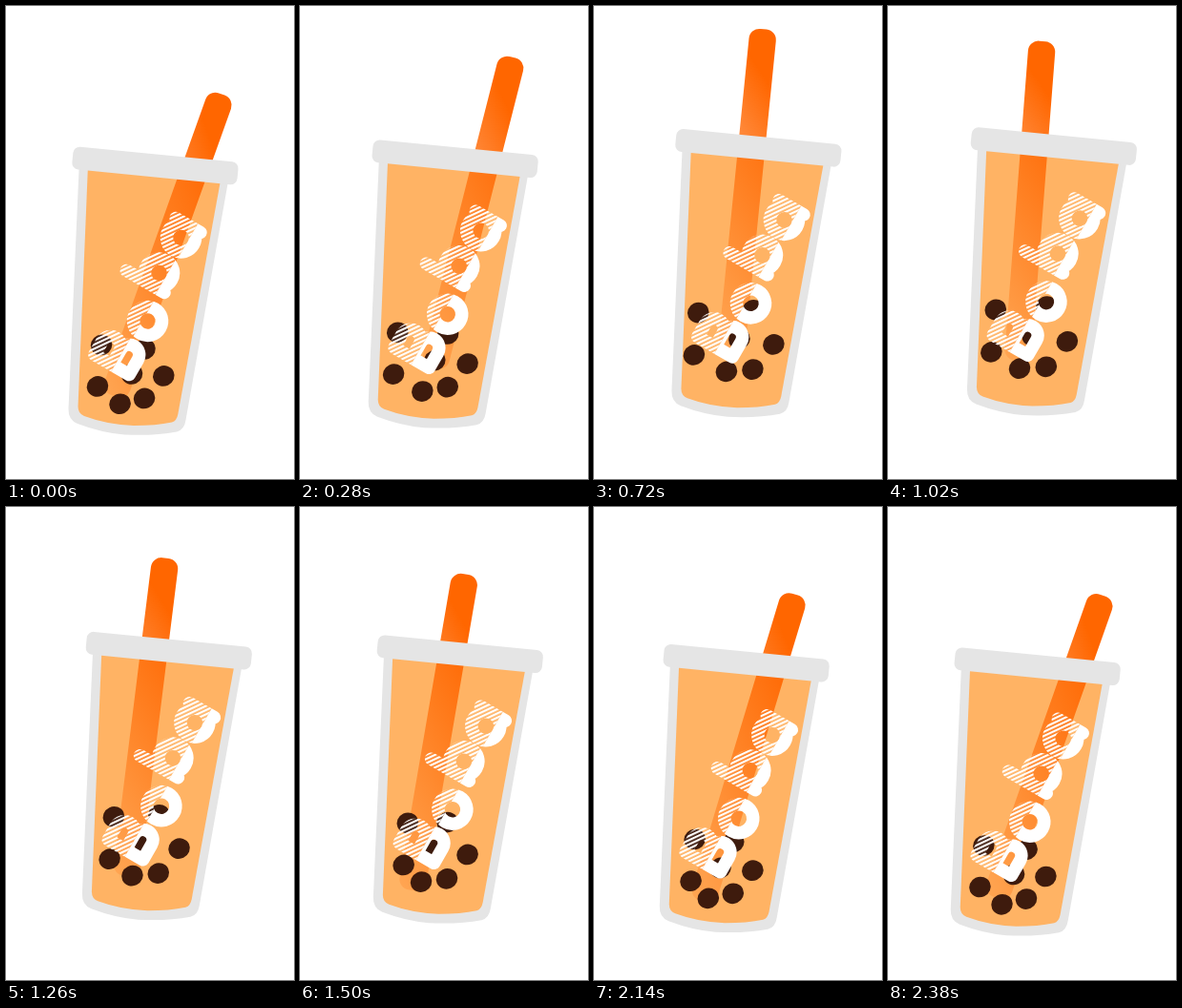
Animation, 302 px wide and 496 px high, one loop 2400 ms. Source, as an HTML page with a canvas:

```html
<!DOCTYPE html>
<html lang="en">
<head>
<meta charset="utf-8">
<title>Bubble tea</title>
<style>
  html, body { margin: 0; width: 100%; height: 100%; overflow: hidden; background: #fff; }
  canvas { display: block; }
</style>
</head>
<body>
<canvas id="stage" width="302" height="496"></canvas>
<script>
const ctx = document.getElementById('stage').getContext('2d');
const LOOP = 2400;
const TAU = Math.PI * 2;
const rad = deg => deg * Math.PI / 180;

// The cup rises, rests, then sinks.
function lift(t) {
  if (t < 800) return t / 800;
  return t < 1000 ? 1 : (LOOP - t) / 1400;
}

// The straw's foot stirs in three curved strokes, measured inside the cup.
const stir = [
  { at: 0, from: [113, 409], bend: [146.5, 381] },
  { at: 600, from: [132.5, 371], bend: [114.5, 397] },
  { at: 1600, from: [103, 419.5], bend: [109, 425] }
];

function strawFoot(t) {
  const i = stir.findLastIndex(stroke => t >= stroke.at);
  const { at, from, bend } = stir[i];
  const next = stir[i + 1] || { at: LOOP, from: stir[0].from };
  const s = (t - at) / (next.at - at);
  return [0, 1].map(k =>
    (1 - s) ** 2 * from[k] + 2 * s * (1 - s) * bend[k] + s * s * next.from[k]);
}

// Resting place of each pearl and how far it floats up.
const pearls = [
  [100, 355.5, 17], [145.5, 360, 25], [132, 386, 20], [96, 399, 16],
  [165.3, 388, 16], [145, 411.5, 13], [119.5, 417.3, 17]
];

const wall = new Path2D('M77 160L65.5 422Q65 434 75 438Q100 447.5 124 449.5Q155 451 179 446.5Q187 444.5 188.5 434L234 178Z');
const liquid = new Path2D('M86 166L75.5 420Q75.5 427.5 82 430Q106 439 134 440Q157 440 174 436.5Q179 435 180.3 428L225.5 180Z');

const glyphs = {
  B: new Path2D('M-14-21H2A10.5 10.5 0 0 1 2 0H-14H4A10.5 10.5 0 0 1 4 21H-14Z'),
  o: ring(),
  b: ring('M-15-31V15'),
  a: ring('M15-15V15')
};
// Each letter: shape, centre, and where its hatching ends.
const word = [['B', 118, 364, 3], ['o', 148.5, 330.5, -5], ['b', 160.5, 280, 8], ['a', 183.5, 243, 8]];

function ring(stem = '') {
  const path = new Path2D(stem);
  path.moveTo(15, 0);
  path.arc(0, 0, 15, 0, TAU);
  return path;
}

function makeHatch() {
  const tile = document.createElement('canvas');
  tile.width = tile.height = 4;
  const g = tile.getContext('2d');
  g.fillStyle = '#fff';
  g.fillRect(0, 0, 4, 2.2);
  const pattern = ctx.createPattern(tile, 'repeat');
  pattern.setTransform(new DOMMatrix().rotate(35));
  return pattern;
}
const hatch = makeHatch();

function fill(path, color) {
  ctx.fillStyle = color;
  ctx.fill(path);
}

function roundBox(x, y, w, h, r) {
  const path = new Path2D();
  path.roundRect(x, y, w, h, r);
  return path;
}

function placed(x, y, angle, paint) {
  ctx.save();
  ctx.translate(x, y);
  ctx.rotate(rad(angle));
  paint();
  ctx.restore();
}

function strokeBand(path, style, top, height) {
  ctx.save();
  ctx.beginPath();
  ctx.rect(-60, top, 120, height);
  ctx.clip();
  ctx.strokeStyle = style;
  ctx.stroke(path);
  ctx.restore();
}

function drawWord() {
  ctx.lineWidth = 13.5;
  ctx.lineCap = ctx.lineJoin = 'round';
  for (const [name, x, y, split] of word) {
    placed(x, y, -60, () => {
      strokeBand(glyphs[name], hatch, -60, 60 + split);
      strokeBand(glyphs[name], '#fff', split, 60);
    });
  }
}

// Drawn upward from the foot; the colour fades towards its lower left.
function drawStraw(t) {
  const paint = ctx.createLinearGradient(14, -276, -146, -146);
  paint.addColorStop(0, '#ff6600');
  paint.addColorStop(1, 'rgba(255,102,0,0.12)');
  const [x, y] = strawFoot(t);
  placed(x, y, 19.7 - 15.5 * lift(t), () => fill(roundBox(-14.2, -336, 28.4, 336, 11), paint));
}

// Pearls float up, spread from the middle and sway; the leftmost sway the other way.
function drawPearls(t) {
  ctx.fillStyle = '#3e1b0d';
  const sway = 4.5 * Math.sin(TAU * t / LOOP);
  for (const [x, y, rise] of pearls) {
    const spread = (x - 130) * 0.09 * lift(t);
    ctx.beginPath();
    ctx.ellipse(x + spread + (x < 110 ? -sway : sway), y - rise * lift(t), 11.4, 10.7, rad(-25), 0, TAU);
    ctx.fill();
  }
}

function draw(t) {
  ctx.resetTransform();
  ctx.clearRect(0, 0, 302, 496);
  ctx.translate(17.7 * lift(t), -20.7 * lift(t));
  fill(wall, '#e5e5e5');
  fill(liquid, '#ffb364');
  drawStraw(t);
  drawPearls(t);
  drawWord();
  placed(156.4, 167.5, 5.6, () => fill(roundBox(-87, -12, 174, 24, 7), '#e5e5e5'));
}

const start = performance.now();
function tick() {
  draw((performance.now() - start) % LOOP);
  requestAnimationFrame(tick);
}
tick();
</script>
</body>
</html>
```
